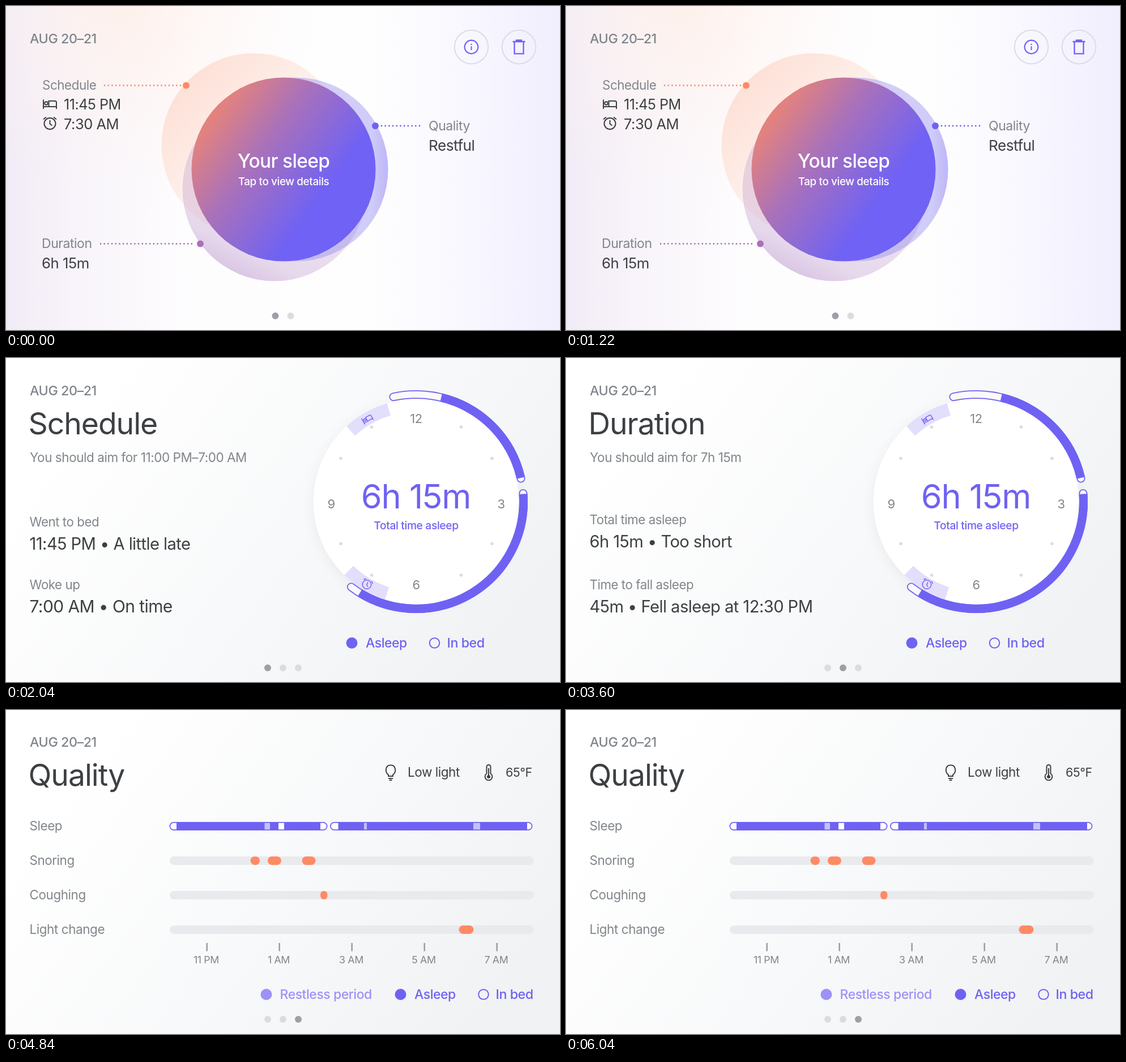
Recreate the animation shown at these times as an HTML page. Size 978 px wide and 573 px high, loop 6840 ms.

```html
<!DOCTYPE html>
<html lang="en">
<head>
<meta charset="utf-8">
<title>Sleep summary</title>
<style>
  html, body { margin: 0; width: 100%; height: 100%; overflow: hidden; background: #fff; }
  svg { display: block; width: 978px; height: 573px; }
  text { font-family: Inter, Roboto, sans-serif; letter-spacing: -.02em; font-optical-sizing: none; }
</style>
</head>
<body>
<svg id="stage" viewBox="0 0 978 573" fill="none">
  <defs>
    <linearGradient id="paper" gradientUnits="userSpaceOnUse" x1="160" y1="60" x2="830" y2="573">
      <stop stop-color="#fff"/><stop offset=".5" stop-color="#f8f9fa"/><stop offset="1" stop-color="#f1f2f4"/>
    </linearGradient>
    <linearGradient id="dawn">
      <stop stop-color="#f1ebf6"/><stop offset=".13" stop-color="#f8f4fa"/><stop offset=".34" stop-color="#fefdfe"/>
      <stop offset=".65" stop-color="#fefefe"/><stop offset=".82" stop-color="#f9f8ff"/><stop offset="1" stop-color="#f1eefe"/>
    </linearGradient>
    <radialGradient id="blush" gradientUnits="userSpaceOnUse" cx="210" cy="0" r="340">
      <stop stop-color="#ffeee7" stop-opacity=".75"/><stop offset="1" stop-color="#fff4f0" stop-opacity="0"/>
    </radialGradient>
    <linearGradient id="orb" gradientUnits="userSpaceOnUse" x1="350" y1="220" x2="540" y2="359">
      <stop stop-color="#e2827f"/><stop offset=".44" stop-color="#a871bb"/><stop offset="1" stop-color="#7062f4"/>
    </linearGradient>
    <linearGradient id="peach" gradientUnits="userSpaceOnUse" x1="310" y1="130" x2="430" y2="250">
      <stop stop-color="#fde0d6"/><stop offset="1" stop-color="#fef1ec"/>
    </linearGradient>
    <linearGradient id="mauve" gradientUnits="userSpaceOnUse" x1="480" y1="370" x2="420" y2="490">
      <stop stop-color="#b48bc6" stop-opacity=".28"/><stop offset=".6" stop-color="#b48bc6" stop-opacity=".32"/>
      <stop offset="1" stop-color="#ab7cc2" stop-opacity=".46"/>
    </linearGradient>
    <linearGradient id="violet" gradientUnits="userSpaceOnUse" x1="600" y1="0" x2="675" y2="0">
      <stop stop-color="#8b80ee" stop-opacity=".38"/><stop offset=".6" stop-color="#8b80ee" stop-opacity=".4"/>
      <stop offset="1" stop-color="#8073f4" stop-opacity=".52"/>
    </linearGradient>
    <filter id="soft" x="-20%" y="-20%" width="140%" height="140%"><feGaussianBlur stdDeviation="12"/></filter>
  </defs>
</svg>
<script>
const INK = '#3c4043', GREY = '#80868b', BLUE = '#6f62f3', PALE = '#c5bff9', ORANGE = '#ff8a65';

const text = (s, x, y, size, fill = INK, weight = 400, anchor = 'start') =>
  `<text x="${x}" y="${y}" font-size="${size}" fill="${fill}" font-weight="${weight}" text-anchor="${anchor}">${s}</text>`;
const mid = (s, x, y, size, fill, weight) => text(s, x, y, size, fill, weight, 'middle');
const disc = (x, y, r, fill) => `<circle cx="${x}" cy="${y}" r="${r}" fill="${fill}"/>`;
const ring = (x, y, r, color, w = 2) => `<circle cx="${x}" cy="${y}" r="${r}" stroke="${color}" stroke-width="${w}"/>`;
const bar = (x1, x2, y, h, fill, r = 0) =>
  `<rect x="${x1}" y="${y}" width="${x2 - x1}" height="${h}" rx="${r}" fill="${fill}"/>`;
const line = (d, color, w = 2, extra = '') => `<path d="${d}" stroke="${color}" stroke-width="${w}" ${extra}/>`;
const place = (x, y, art, turn = 0, scale = 1) =>
  `<g transform="translate(${x} ${y}) rotate(${turn}) scale(${scale})">${art}</g>`;
const page = fill => `<rect width="978" height="573" fill="${fill}"/>`;
const date = y => text('AUG 20–21', 42, y, 23.3, GREY, 500);
const dots = (xs, y, active) => xs.map((x, i) => disc(x, y, 6, i === active ? '#9aa0a6' : '#dadce0')).join('');
const pager = (active, y = 548) => dots([462, 489, 516], y, active);

const bed = (c, w = 2) => line('M-11.5-8V8.5M-11.5 4.5H11.5M11.5 8.5V-3Q11.5-5.5 9-5.5H-2V4.5', c, w) + ring(-6.5, -1.5, 2.8, c, w);
const alarm = (c, w = 2) => ring(0, 0, 10, c, w) + line('M0-6V.5L4 3.5M-11.5-7.5L-6.5-11.5M11.5-7.5L6.5-11.5', c, w);

function overview() {
  const leader = (x1, x2, y, c) => line(`M${x1} ${y}H${x2}`, c, 2.8, 'stroke-linecap="round" stroke-dasharray="0 6.7"');
  const R = 162.5;
  return page('url(#dawn)') + page('url(#blush)') + date(66) +
    disc(437, 246, R, 'url(#peach)') + disc(474, 324, R, 'url(#mauve)') +
    disc(512, 289, R, 'url(#violet)') + disc(490, 289, R, 'url(#orb)') +
    mid('Your sleep', 490, 286, 33.5, '#fff', 500) + mid('Tap to view details', 490, 317, 18.9, '#fff', 500) +
    leader(174, 309, 140.5, ORANGE) + disc(318, 140.5, 6, ORANGE) +
    leader(663, 736, 212, BLUE) + disc(652, 212, 6, BLUE) +
    leader(167, 331, 420.5, '#a970bd') + disc(343, 420.5, 6, '#a970bd') +
    text('Schedule', 64, 147.5, 22.4, GREY) + text('11:45 PM', 102, 183, 25.2) + text('7:30 AM', 102, 218, 25.5) +
    place(77.5, 173.5, bed(INK)) + place(77.5, 208, alarm(INK)) +
    text('Quality', 746, 220, 23, GREY) + text('Restful', 746, 256, 26.2) +
    text('Duration', 63, 428, 23, GREY) + text('6h 15m', 63, 464, 25.8) +
    [821.5, 905.5].map(x => ring(x, 72.5, 29.7, '#dddbe5')).join('') +
    place(821.5, 72.5, ring(0, 0, 11.8, BLUE, 2.2) + line('M0-1.5V5.5M0-5.7V-3.5', BLUE)) +
    place(905.5, 72.5, line('M-8-8.5V11.8H8V-8.5M-11-9.5H11M-4.5-10V-12H4.5V-10', BLUE, 2.3)) +
    dots([475.5, 502.5], 548, 0);
}

function clock() {
  const cx = 724, cy = 254;
  // Angles are in degrees clockwise from twelve o'clock.
  const arc = (a, b, r, w, color, cap = 'butt') => {
    const at = deg => {
      const t = deg * Math.PI / 180;
      return `${(cx + r * Math.sin(t)).toFixed(2)} ${(cy - r * Math.cos(t)).toFixed(2)}`;
    };
    return line(`M${at(a)}A${r} ${r} 0 ${b - a > 180 ? 1 : 0} 1 ${at(b)}`, color, w, `stroke-linecap="${cap}"`);
  };
  const span = (a, from, to, b) => arc(a, b, 189.5, 15, BLUE, 'round') +
    arc(a, b, 189.5, 11.4, '#f9f9fb', 'round') + arc(from, to, 189.5, 15, BLUE);
  const marks = [[79, 131], [133.5, 75.5]].flatMap(([x, y]) =>
    [[1, 1], [1, -1], [-1, 1], [-1, -1]].map(([i, j]) => disc(cx + .5 + i * x, cy - 1 + j * y, 2.8, '#dadce0')));
  return `<circle cx="${cx}" cy="${cy + 5}" r="179" fill="#3c4043" opacity=".09" filter="url(#soft)"/>` +
    disc(cx, cy, 181.5, '#fff') +
    arc(-42.7, -16.5, 170, 22.5, '#e2defc') + arc(197.6, 224.3, 170, 22.5, '#e2defc') + marks.join('') +
    span(-12.2, 13.5, 77.2, 77.5) + span(85.6, 85.9, 211.6, 217.2) +
    place(638, 108, bed(BLUE, 1.9), -29, .74) + place(637, 400.5, alarm(BLUE, 1.9), 25, .78) +
    mid('12', 724, 115, 22, GREY) + mid('3', 874, 266, 22, GREY) +
    mid('6', 724, 409, 22, GREY) + mid('9', 574, 266, 22, GREY) +
    mid('6h 15m', 723.5, 266, 59.6, BLUE) + mid('Total time asleep', 724, 303, 19.3, BLUE, 500) +
    disc(610.5, 504, 10, BLUE) + text('Asleep', 635, 512, 23, BLUE, 500) +
    ring(756.5, 504, 8.8, BLUE) + text('In bed', 778.5, 512, 23.3, BLUE, 500);
}

const detail = (active, title, goal, y, rows) => page('url(#paper)') + date(66) +
  text(title, 39.5, 135, 53.5) + text(goal, 42, 183.5, 22.5, GREY) +
  rows.map(([label, value, size], i) => {
    const top = i ? 409 : y;
    return text(label, 41.5, top, 22.3, GREY) + text(value, 41.5, top + 41, size);
  }).join('') + clock() + pager(active);

function quality() {
  const track = (y, pills) => bar(289, 932, y, 15, '#e8eaed', 7.5) +
    pills.map(([a, b]) => bar(a, b, y, 15, ORANGE, Math.min(7.5, (b - a) / 2))).join('');
  const capsule = (a, from, to, b) => bar(a, b, 198, 15, BLUE, 7.5) +
    bar(a + 1.8, b - 1.8, 199.8, 11.4, '#fff', 5.7) + bar(from, to, 198, 15, BLUE);
  const rest = (a, b, c) => bar(a, b, 199.7, 11.6, c);
  return page('url(#paper)') + date(65) + text('Quality', 39.5, 134, 53.5) +
    place(679, 110, line('M-4 7V4.5C-11-.5-9-12.5 0-12.5S11-.5 4 4.5V7ZM-4 11H4M-2.5 14H2.5', INK)) +
    text('Low light', 709, 118, 22.5) +
    place(852, 110, line('M-3.5 2.5V-9.5A3.5 3.5 0 0 1 3.5-9.5V2.5A6.4 6.4 0 1 1-3.5 2.5ZM0-7V7', INK) + disc(0, 8, 3, INK)) +
    text('65°F', 882, 118, 21.5) +
    ['Sleep', 'Snoring', 'Coughing', 'Light change'].map((s, i) => text(s, 41.5, 213 + i * 61.1, 22.5, GREY)).join('') +
    capsule(288.5, 301, 555, 567.5) + capsule(572, 586.5, 920, 929.5) +
    rest(456.5, 466, PALE) + rest(481, 491, '#fff') + rest(632, 637, PALE) + rest(825, 837, PALE) +
    track(259, [[431.5, 448], [462, 486], [522.5, 546.5]]) + track(320, [[555, 567.5]]) + track(381, [[799.5, 825.5]]) +
    ['11 PM', '1 AM', '3 AM', '5 AM', '7 AM'].map((s, i) =>
      line(`M${354.7 + i * 128} 412V426.5`, '#9aa0a6', 2.6) + mid(s, 353.5 + i * 128, 448, 17.8, GREY)).join('') +
    disc(459.5, 503, 10, '#9c92f8') + text('Restless period', 483.5, 511, 23, '#9c92f8', 500) +
    disc(696.5, 503, 10, BLUE) + text('Asleep', 721, 511, 23, BLUE, 500) +
    ring(843, 503, 8.8, BLUE) + text('In bed', 864.5, 511, 23.3, BLUE, 500) +
    pager(2, 547);
}

const scenes = [
  overview(),
  detail(0, 'Schedule', 'You should aim for 11:00 PM–7:00 AM', 298,
    [['Went to bed', '11:45 PM • A little late', 29.2], ['Woke up', '7:00 AM • On time', 30]]),
  detail(1, 'Duration', 'You should aim for 7h 15m', 294,
    [['Total time asleep', '6h 15m • Too short', 29.2], ['Time to fall asleep', '45m • Fell asleep at 12:30 PM', 29.2]]),
  quality()
];
const ends = [2040, 3600, 4840, 6840];

const stage = document.getElementById('stage');
stage.insertAdjacentHTML('beforeend', scenes.map(s => `<g class="scene">${s}</g>`).join(''));
const layers = stage.querySelectorAll('.scene');

function draw() {
  const t = performance.now() % 6840;
  const now = ends.findIndex(end => t < end);
  layers.forEach((layer, i) => { layer.style.display = i === now ? '' : 'none'; });
  requestAnimationFrame(draw);
}
draw();
</script>
</body>
</html>
```
